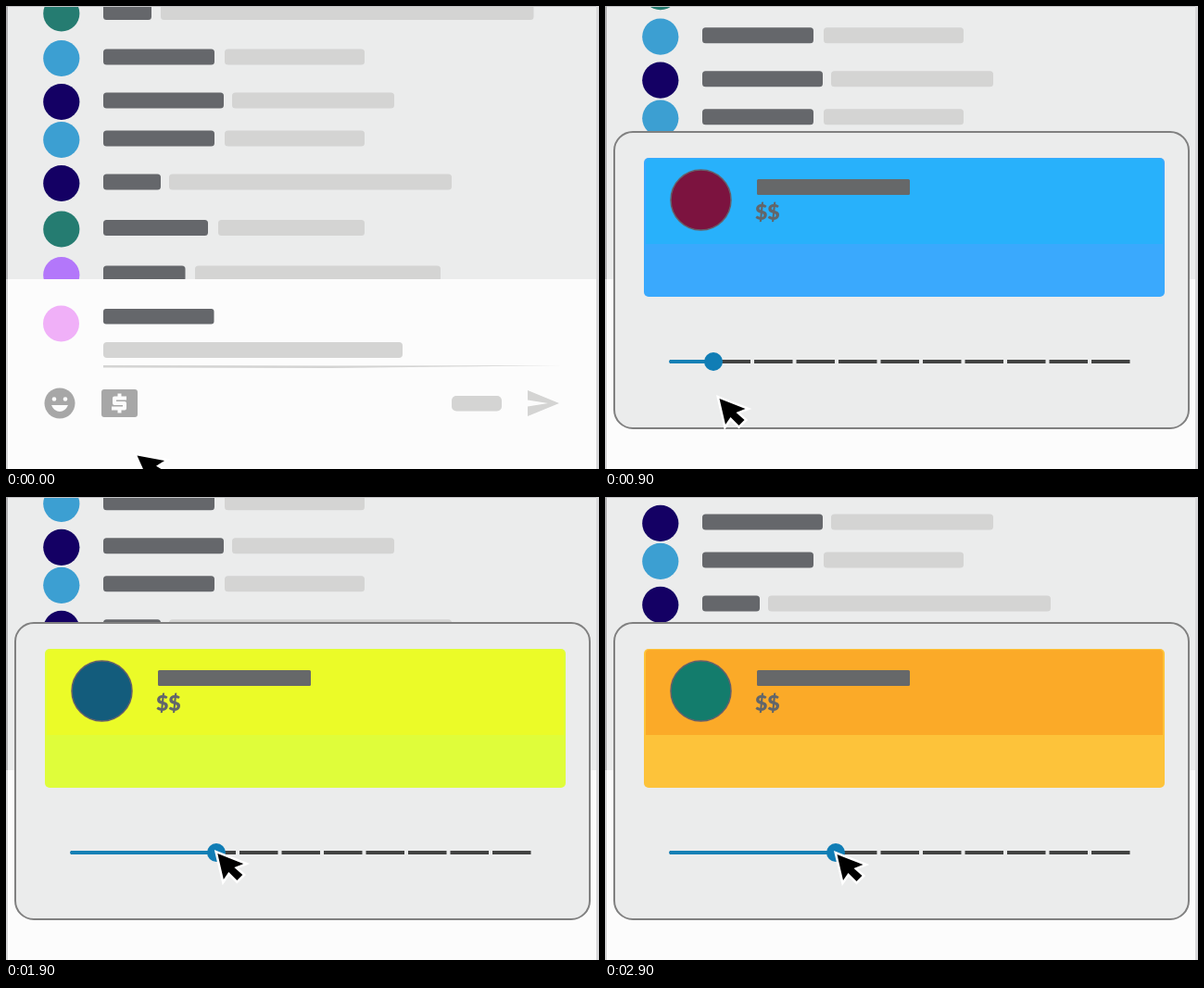
An HTML page that plays this animation: 640 px wide and 500 px high, repeating every 3 s.

```html
<!DOCTYPE html>
<html lang="en">
<head>
<meta charset="utf-8">
<title>Chat donation slider</title>
<style>
  html, body { margin: 0; height: 100%; overflow: hidden; }
  svg { display: block; width: 100vw; height: 100vh; }
  .name { fill: #65676b; }
  .text { fill: #d4d4d3; }
  .icon { fill: #a7a7a7; }
  .amount { font: 900 23px Lato, sans-serif; fill: #62666a; }
</style>
</head>
<body>
<svg viewBox="0 0 640 500">
  <rect width="640" height="500" fill="#ebecec"/>
  <g id="list"></g>

  <g id="composer">
    <rect y="295" width="640" height="205" fill="#fcfcfc"/>
    <circle cx="59.5" cy="343" r="19.5" fill="#f0b0f8"/>
    <rect class="name" x="105" y="327" width="119.5" height="16.5" rx="3"/>
    <rect class="text" x="105" y="363" width="323" height="17" rx="4"/>
    <path class="text" d="M105 388L350 388.5L600 388L480 389.5L350 391L105 390.5Z"/>
    <circle class="icon" cx="58" cy="429" r="16.5"/>
    <g fill="#fcfcfc">
      <circle cx="52" cy="424.5" r="2.3"/>
      <circle cx="64" cy="424.5" r="2.3"/>
      <path d="M49 431H67Q64 438 58 438T49 431Z"/>
    </g>
    <rect class="icon" x="103" y="414" width="39" height="30" rx="3"/>
    <path d="M130 423.5H117V429H128V434.5H114M122.500 418.500V423M122.500 435V439.500"
          fill="none" stroke="#fcfcfc" stroke-width="4" stroke-linejoin="round"/>
    <rect class="text" x="481" y="421" width="54" height="16.500" rx="5"/>
    <path class="text" d="M563 415L597 429L563 443V432.500L585 429L563 425.500Z"/>
  </g>

  <rect width="640" height="1" fill="#c4c4c6"/>
  <rect width="2" height="295" fill="#b0b0b2"/>
  <rect y="295" width="2" height="205" fill="#d4d4d5"/>
  <rect x="637" width="3" height="500" fill="#d8d8da"/>

  <g id="popup">
    <rect x="10" y="136" width="620" height="320" rx="20" fill="#ebecec" stroke="#808080" stroke-width="2"/>
    <rect id="card" x="42" y="164" width="562" height="150" rx="5"/>
    <path id="header" d="M44 257V169Q44 165 48 165H598Q602 165 602 169V257Z"/>
    <circle id="avatar" cx="103.500" cy="209.500" r="32.500" stroke="#66606a" stroke-width="1.500"/>
    <rect x="164" y="187" width="165" height="17" rx="1.500" fill="#666869"/>
    <text class="amount" x="162" y="231">$$</text>
    <path d="M70 384H567" stroke="#424342" stroke-width="4" stroke-dasharray="41.500 4"/>
    <path id="track" stroke="#1580b5" stroke-width="4" stroke-linecap="round"/>
    <circle id="knob" cy="384" r="10" fill="#107db5"/>
  </g>

  <path id="cursor" d="M0 0L28 11L18 15L27 23L21 29L12 20L6.500 28Z"
        stroke="#fff" stroke-width="5" stroke-linejoin="miter" paint-order="stroke"/>
</svg>

<script>
const LOOP = 3000, STEP = 100;
const $ = id => document.getElementById(id);

// centre y, colour, name end, message start, message end
const rows = [
  [8, '#257c71', 157, 167, 569.5],
  [56.5, '#3c9fd2', 225, 236, 387],
  [103.5, '#140064', 235, 244, 419],
  [144.5, '#3c9fd2', 225, 236, 387],
  [191.5, '#140064', 167, 176, 481],
  [241, '#257c71', 218, 229, 387],
  [290.500, '#b377fa', 193.5, 204, 469],
];
const bar = (kind, x1, x2, y) =>
  `<rect class="${kind}" x="${x1}" y="${y - 8.5}" width="${x2 - x1}" height="17" rx="3.5"/>`;
$('list').innerHTML = rows.map(([y, color, nameEnd, textStart, textEnd]) =>
  `<circle cx="59.8" cy="${y}" r="19.6" fill="${color}"/>` +
  bar('name', 105, nameEnd, y - 1.5) + bar('text', textStart, textEnd, y - 1.5)).join('');

// time, x, y, angle
const cursorKeys = [
  [0, 141.5, 485.5, -11],
  [500, 123.5, 424, 0],
  [1200, 123.5, 424, 0],
  [1400, 117.5, 380.5, 0],
  [2000, 250.5, 386, 0],
  [LOOP, 250.5, 386, 0],
];

const progress = (t, from, to) => Math.min(1, Math.max(0, (t - from) / (to - from)));

function cursorAt(t) {
  const i = cursorKeys.findIndex(key => t < key[0]);
  const a = cursorKeys[i - 1], b = cursorKeys[i];
  const p = progress(t, a[0], b[0]);
  return a.slice(1).map((v, k) => v + (b[k + 1] - v) * p);
}

function draw(now) {
  const t = Math.floor(now % LOOP / STEP) * STEP;
  const drag = progress(t, 1400, 2000);
  const knobX = 117 + 132 * drag;
  const color = (hue, sat, light) => `hsl(${hue - 164 * drag}, ${sat}%, ${light}%)`;
  const [x, y, angle] = cursorAt(t);

  $('list').setAttribute('transform', `translate(0 ${-0.0259 * t})`);
  $('popup').setAttribute('transform', `translate(0 ${365 * (1 - progress(t, 600, 900))})`);
  $('card').setAttribute('fill', color(206, 98, 61));
  $('header').setAttribute('fill', color(201, 96, 57));
  $('avatar').setAttribute('fill', color(335, 73, 28));
  $('track').setAttribute('d', `M71 384H${knobX}`);
  $('knob').setAttribute('cx', knobX);
  $('cursor').setAttribute('transform', `translate(${x} ${y}) rotate(${angle})`);
  requestAnimationFrame(() => draw(performance.now() - start));
}

const start = performance.now();
draw(0);
</script>
</body>
</html>
```
